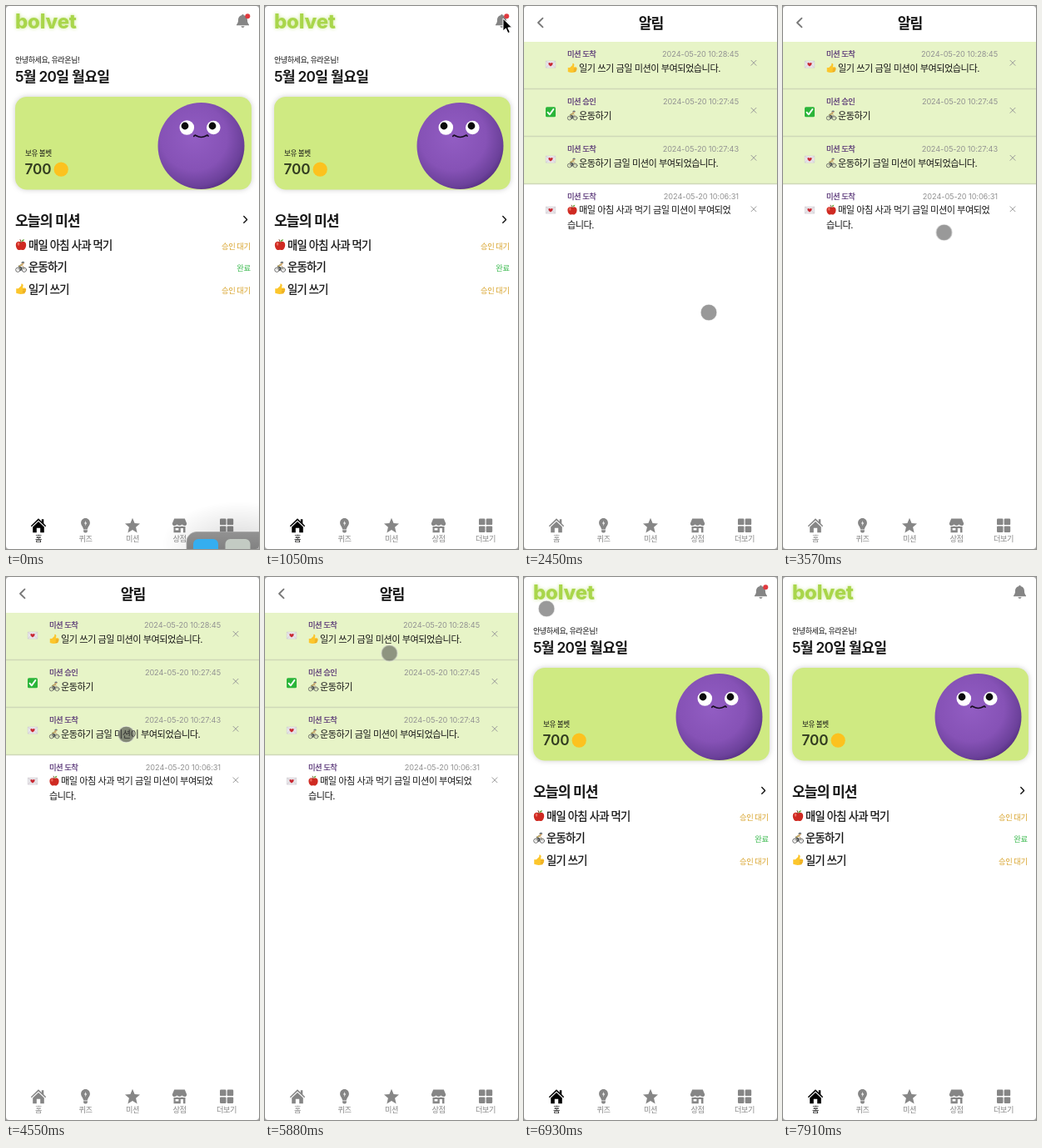
Recreate the animation shown at these times as an HTML page. Size 304 by 652 pixels, loop 8 s.

```html
<!DOCTYPE html>
<html lang="ko">
<head>
<meta charset="utf-8">
<title>Mission app</title>
<style>
html, body { margin: 0; width: 100%; height: 100%; overflow: hidden; background: #a9a9a9; }
svg { display: block; width: 304px; height: 652px; }
text {
  font-family: Inter, "Noto Sans CJK KR", "Noto Sans CJK", sans-serif;
  letter-spacing: -.055em; fill: #151515; white-space: pre;
}
.h1 { font-size: 17.2px; font-weight: 600; }
.mixed { letter-spacing: -.04em; }
.brand { font-size: 24px; font-weight: 800; letter-spacing: -.01em; fill: #a9d64b; filter: drop-shadow(0 0 2px #cbe88f); }
.item { font-size: 13.3px; font-weight: 500; stroke: #151515; stroke-width: .3px; }
.state { font-size: 9.35px; text-anchor: end; fill: #d9a52f; }
.done { fill: #3dba50; }
.small { font-size: 9.1px; }
.tag { font-size: 9.35px; font-weight: 500; fill: #4f2a70; stroke: #4f2a70; stroke-width: .2px; }
.time { font-size: 9.2px; text-anchor: end; letter-spacing: -.01em; fill: #929292; }
.msg { font-size: 11.2px; letter-spacing: -.045em; }
.nav { fill: #868686; }
.nav text { font-size: 9.2px; text-anchor: middle; fill: inherit; }
.line { fill: none; stroke-linecap: round; stroke-linejoin: round; }

/* All tracks share one 8 s clock */
.home, .alerts, .tab, .badge, .arrow, .touch, .dock { animation: 8s linear infinite; }
.home { animation-name: home; animation-timing-function: step-end; }
.alerts { animation-name: alerts; animation-timing-function: step-end; }
.tab { animation-name: tab; animation-timing-function: step-end; }
.badge { animation-name: badge; animation-timing-function: step-end; }
.arrow { animation-name: arrow; }
.touch { animation-name: touch; }
.dock { animation-name: dock; }
.press { stroke: #fff8; animation: press 8s step-end infinite; }

@keyframes home { 0%, 85.75%, 100% { opacity: 1 } 22.75% { opacity: 0 } }
@keyframes alerts { 0%, 85.75%, 100% { opacity: 0 } 22.75% { opacity: 1 } }
@keyframes tab { 0%, 85.75%, 100% { fill: #000 } 22.75% { fill: #868686 } }
@keyframes badge { 0% { opacity: 1 } 88.75%, 100% { opacity: 0 } }
@keyframes press { 0%, 60.3%, 100% { fill: #4646468c } 56% { fill: #40404099 } }
@keyframes dock {
  0%, .8% { transform: none }
  4.3%, 100% { transform: translateY(66px) }
}
@keyframes arrow {
  0%, 6.1% { transform: translate(314px, 60px) }
  7% { transform: translate(299px, 54px); animation-timing-function: ease-out }
  12.3%, 13.2% { transform: translate(286px, 15px) }
  14%, 15% { transform: translate(286px, 17px) }
  17.5%, 20.2% { transform: translate(285px, 20px) }
  21%, 22.74% { transform: translate(285px, 22px) }
  22.75%, 100% { transform: translate(330px, 22px) }
}
@keyframes touch {
  0%, 22.74% { transform: translate(330px, 28px) }
  22.75% { transform: translate(283px, 28px); animation-timing-function: ease-in-out }
  30.6%, 35.1% { transform: translate(222px, 368px) }
  42%, 43% { transform: translate(200px, 285px) }
  53.4% { transform: translate(159px, 202px) }
  56.8%, 59.6% { transform: translate(144.5px, 189px) }
  61.2% { transform: translate(148px, 172px) }
  63% { transform: translate(131px, 126px) }
  63.9% { transform: translate(135px, 130px) }
  65.6%, 66.6% { transform: translate(147px, 140px) }
  68.5% { transform: translate(162px, 128px) }
  71.75% { transform: translate(152px, 95px) }
  73.5%, 73.8% { transform: translate(149.5px, 91.5px) }
  75.6% { transform: translate(187px, 220px) }
  77.5% { transform: translate(174px, 317px) }
  80% { transform: translate(90px, 160px); animation-timing-function: ease-out }
  83.1%, 85% { transform: translate(18px, 20px) }
  86.6% { transform: translate(27px, 38px); animation-timing-function: ease-in }
  95.4% { transform: translate(158px, 121px) }
  98.8%, 100% { transform: translate(318px, 294px) }
}
</style>
</head>
<body>
<svg viewBox="0 0 304 652">
  <defs>
    <radialGradient id="ball" cx=".42" cy=".4" r=".64">
      <stop offset="0" stop-color="#925dc3"/>
      <stop offset=".6" stop-color="#8652b6"/>
      <stop offset=".88" stop-color="#6c419b"/>
      <stop offset="1" stop-color="#563080"/>
    </radialGradient>
    <radialGradient id="shade">
      <stop offset=".3" stop-color="#000" stop-opacity=".1"/>
      <stop offset="1" stop-color="#000" stop-opacity="0"/>
    </radialGradient>
    <linearGradient id="bar" x2="0" y2="1">
      <stop offset="0" stop-color="#929292"/>
      <stop offset="1" stop-color="#6c6c6c"/>
    </linearGradient>
    <clipPath id="screen"><rect width="304" height="652" rx="4"/></clipPath>

    <!-- emoji, centred on the origin, 13 units wide -->
    <g id="apple">
      <path d="M0-3C-2-5-6.3-4.2-6.2.2-6.1 4-3.7 6.6-1.8 6.3Q0 5.7 1.8 6.3C3.7 6.6 6.1 4 6.2.2 6.3-4.2 2-5 0-3Z" fill="#cf2a22"/>
      <ellipse cx="-3" cy="-1" rx="1.3" ry="2" fill="#ec6a5c"/>
      <path d="M0-2.8Q0-4.8-.9-6.2" class="line" stroke="#6b3b1c"/>
      <path d="M.3-4Q1-6.6 4-6.6 3.4-4 .3-4Z" fill="#58a52e"/>
    </g>
    <g id="bike">
      <g class="line" stroke="#5c5c5c" stroke-width=".9">
        <circle cx="-3.7" cy="3.4" r="2.6"/><circle cx="3.9" cy="3.4" r="2.6"/>
        <path d="M-3.7 3.4-1.5.2 3 .4 3.9 3.4M-1.5.2 0 3.4 3 .4" stroke="#8a8a80" stroke-width=".8"/>
      </g>
      <path d="M1.4-3-2.6-.8.6 1.2-.2 4" class="line" stroke="#454b50" stroke-width="1.5"/>
      <path d="M1.4-2.9-1.8-1.2" class="line" stroke="#c3ab62" stroke-width="1.8"/>
      <path d="M1-2.3 3.2-.3" class="line" stroke="#d9ad78" stroke-width="1"/>
      <circle cx="2.2" cy="-4.6" r="1.6" fill="#d9ad78"/>
      <path d="M.3-4.7Q.6-6.7 2.5-6.6 4.3-6.3 4.2-4.9Z" fill="#67747c"/>
    </g>
    <g id="thumb">
      <path d="M-5.8-.5H-3.2L.2-3.8.4-6.2Q2.4-6.7 2.7-4.2L2-1.3H5Q6.5-.9 5.9.7 6.5 2 5.5 2.8 5.7 4 4.6 4.5 4.5 6-.5 6.2-3 6-5.8 5Z" fill="#fcc62c"/>
      <path d="M2.6.8H5.8M2.5 2.7H5.4M2.2 4.5H4.5" class="line" stroke="#d68c1b" stroke-width=".6"/>
    </g>
    <g id="letter">
      <rect x="-5.8" y="-4" width="11.6" height="8.2" rx=".8" fill="#e9e6ea" stroke="#cdc8cf" stroke-width=".5"/>
      <path d="M-5.5 3.9-1.5 0M5.5 3.9 1.5 0M-5.5-3.7 0 1.2 5.5-3.7" class="line" stroke="#bdb7c0" stroke-width=".5"/>
      <path d="M0 2.6C-3.3.2-3-2-1.6-2.1Q-.5-2.2 0-1.1.5-2.2 1.6-2.1C3-2 3.3.2 0 2.6Z" fill="#c92a34"/>
    </g>
    <g id="check">
      <rect x="-6" y="-6" width="12" height="12" rx="1.6" fill="#2bb53a"/>
      <path d="M-3.5.4-1.2 3.1 3.5-3.4" class="line" stroke="#fff" stroke-width="1.8"/>
    </g>
    <path id="close" d="M-3-3 3 3M3-3-3 3" class="line" stroke="#999" stroke-width="1"/>
  </defs>

  <g clip-path="url(#screen)">
    <rect width="304" height="652" fill="#fff"/>

    <g class="home">
      <text class="brand" x="11" y="27">bolvet</text>
      <path d="M284.5 10Q285.7 10 285.8 11.3C289 12 290 14.4 290 17.2 290 20 291 21 292 22.3V23.2H277V22.3C278 21 279 20 279 17.2 279 14.4 280 12 283.2 11.3Q283.3 10 284.5 10ZM282.4 24.2H286.6Q286.3 26 284.5 26T282.4 24.2Z" fill="#858585"/>
      <circle class="badge" cx="290.3" cy="12.3" r="3" fill="#e0393e"/>
      <text class="small" x="11" y="68.2">안녕하세요, 유라온님!</text>
      <text class="h1 mixed" x="11" y="91.2">5월 20일 월요일</text>

      <rect x="11" y="109" width="284" height="111.5" rx="14" fill="#cfea82" style="filter:drop-shadow(0 0 3px #0003)"/>
      <circle cx="234.5" cy="168" r="52" fill="url(#ball)"/>
      <g fill="#fff"><circle cx="217.3" cy="146" r="8.8"/><circle cx="249.3" cy="146" r="8.3"/></g>
      <g fill="#0b0b0b"><circle cx="215" cy="144" r="4.4"/><circle cx="248" cy="144" r="4.4"/></g>
      <path d="M225.8 156.4Q226.8 154.4 228.6 155.8 234.5 159.2 240.6 155.8 242 154.4 243 156.2" class="line" stroke="#150c1d" stroke-width="1.7"/>
      <text style="font-size:8.6px" x="23" y="179.6">보유 볼벳</text>
      <text style="font-size:17.2px;font-weight:600;letter-spacing:-.01em;fill:#333d20" x="22.5" y="202.2">700</text>
      <circle cx="66.2" cy="196.2" r="8.6" fill="#fcc21f"/>

      <text class="h1" x="11" y="264.3">오늘의 미션</text>
      <path d="M285.8 252.5 289.6 256.4 285.8 260.3" class="line" stroke="#111" stroke-width="1.4"/>
      <use href="#apple" x="18" y="286.8"/>
      <text class="item" x="27" y="291.7">매일 아침 사과 먹기</text>
      <text class="state" x="293.5" y="291.8">승인 대기</text>
      <use href="#bike" x="18" y="313.4"/>
      <text class="item" x="27" y="318.2">운동하기</text>
      <text class="state done" x="293.5" y="318.3">완료</text>
      <use href="#thumb" x="18" y="339.8"/>
      <text class="item" x="27" y="344.7">일기 쓰기</text>
      <text class="state" x="293.5" y="344.8">승인 대기</text>
    </g>

    <g class="alerts">
      <path d="M22.5 14.6 17 20 22.5 25.4" class="line" stroke="#777" stroke-width="1.8"/>
      <text class="h1" x="152.5" y="26.8" text-anchor="middle">알림</text>
      <rect y="43" width="304" height="171" fill="#e7f4c7"/>
      <path d="M0 99.5H304M0 156.5H304M0 213.5H304" stroke="#cfd8b8" stroke-width="1.4"/>

      <use href="#letter" x="32" y="70"/>
      <text class="tag" x="52" y="60.8">미션 도착</text>
      <text class="time" x="258" y="60.8">2024-05-20 10:28:45</text>
      <use href="#thumb" transform="translate(58 74.5) scale(.9)"/>
      <text class="msg" x="66" y="78.8">일기 쓰기 금일 미션이 부여되었습니다.</text>
      <use href="#close" x="276" y="68.3"/>

      <use href="#check" x="32" y="127.3"/>
      <text class="tag" x="52" y="117.8">미션 승인</text>
      <text class="time" x="258" y="117.8">2024-05-20 10:27:45</text>
      <use href="#bike" transform="translate(58 131.5) scale(.9)"/>
      <text class="msg" x="66" y="135.8">운동하기</text>
      <use href="#close" x="276" y="125.3"/>

      <use href="#letter" x="32" y="184"/>
      <text class="tag" x="52" y="174.8">미션 도착</text>
      <text class="time" x="258" y="174.8">2024-05-20 10:27:43</text>
      <use href="#bike" transform="translate(58 188.5) scale(.9)"/>
      <text class="msg" x="66" y="192.8">운동하기 금일 미션이 부여되었습니다.</text>
      <use href="#close" x="276" y="182.3"/>

      <use href="#letter" x="32" y="245"/>
      <text class="tag" x="52" y="231.8">미션 도착</text>
      <text class="time" x="258" y="231.8">2024-05-20 10:06:31</text>
      <use href="#apple" transform="translate(58 244.8) scale(.9)"/>
      <text class="msg" x="66" y="249.2">매일 아침 사과 먹기 금일 미션이 부여되었</text>
      <text class="msg" x="52" y="266.7">습니다.</text>
      <use href="#close" x="276" y="243.8"/>
    </g>

    <g class="nav">
      <g class="tab">
        <path d="M39 615.2 42.8 618.9V616.2H45.3V621.3L48.2 624.2 47.2 625.3 39 617.5 30.8 625.3 29.8 624.2ZM39 619 45.8 625.4V632.2H41.2V626.8H36.8V632.2H32.2V625.4Z"/>
        <text x="39" y="643.3" style="font-weight:500">홈</text>
      </g>
      <path d="M95.5 615C98.8 615 100.9 617.5 100.9 620.5 100.9 623.9 98.1 625.4 97.9 628.4H93.1C92.9 625.4 90.1 623.9 90.1 620.5 90.1 617.5 92.2 615 95.5 615ZM93.1 629.2H97.9V631Q97.5 632.6 95.5 632.6T93.1 631Z"/>
      <path d="M96 618 94 621.4H95.5L95 624.4 97.2 620.6H95.7Z" fill="#fff"/>
      <text x="95.5" y="643.3">퀴즈</text>
      <path d="M152 614.8 154.6 621.1 161 621.6 156.1 625.8 157.6 632.4 152 628.9 146.4 632.4 147.9 625.8 143 621.6 149.4 621.1Z"/>
      <text x="152" y="643.3">미션</text>
      <path d="M202.2 615.5H214.8L217.2 621.2Q217.2 624 214.5 624 212.3 624 211.5 622.6 210.5 624 208.5 624T205.5 622.6Q204.7 624 202.5 624 199.8 624 199.8 621.2ZM201.5 625Q204 625.3 205.5 624.4 208.5 625.8 211.5 624.4 213 625.3 215.5 625V632.3H213V627H209.8V632.3H201.5Z"/>
      <path d="M203.6 627H207.4V629.6H203.6Z" fill="#fff"/>
      <text x="208.5" y="643.3">상점</text>
      <rect x="257" y="615.6" width="7.5" height="7.5" rx="1.2"/>
      <rect x="265.7" y="615.6" width="7.5" height="7.5" rx="1.2"/>
      <rect x="257" y="624.4" width="7.5" height="7.5" rx="1.2"/>
      <rect x="265.7" y="624.4" width="7.5" height="7.5" rx="1.2"/>
      <text x="265" y="643.3">더보기</text>
    </g>

    <g class="dock">
      <ellipse cx="280" cy="645" rx="92" ry="50" fill="url(#shade)"/>
      <rect x="217" y="631.5" width="110" height="46" rx="12" fill="url(#bar)" stroke="#a5a5a5" stroke-width=".8"/>
      <rect x="225" y="640" width="30" height="30" rx="6" fill="#35aef0"/>
      <rect x="263.5" y="640" width="30" height="30" rx="6" fill="#c3cbc3"/>
    </g>

    <g class="touch"><circle class="press" r="9.8"/></g>
    <path class="arrow" d="M0 0V15L3.4 11.9 5.9 17.6 8.4 16.5 5.9 11 10.6 10.8Z" fill="#000" stroke="#fff" stroke-width="1"/>
  </g>
</svg>
</body>
</html>
```
